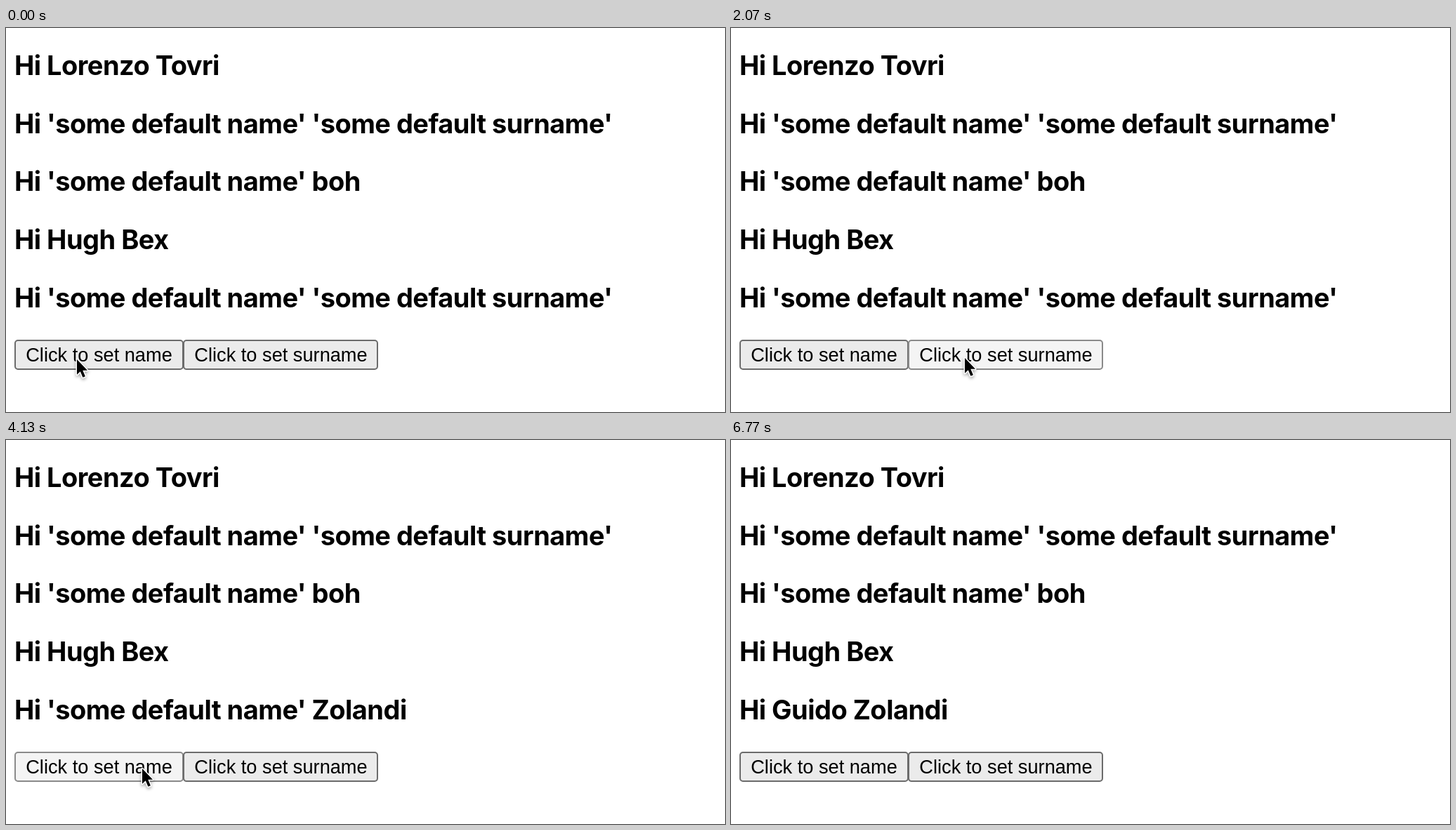
Animation of 1024 by 547 pixels, one loop 6.83 s. Source, as an HTML page:

```html
<!DOCTYPE html>
<html lang="en">
<head>
<meta charset="utf-8">
<title>Greeting demo</title>
<style>
  html, body { margin: 0; width: 100%; height: 100%; overflow: hidden; background: #fff; }
  .stage { position: relative; width: 1024px; height: 547px; overflow: hidden; color: #000; }

  h3 {
    position: absolute; left: 12px; top: calc(30px + 82.7px * var(--row)); margin: 0;
    font: 700 38px/46px Inter, "Liberation Sans", sans-serif;
    letter-spacing: -0.53px; white-space: pre;
  }

  .btn {
    position: absolute; top: 444px; height: 43px; box-sizing: border-box;
    border: 2px solid #6b6b6b; border-radius: 5px; background: #ebebeb;
    font: 27.2px/40px "Liberation Sans", Arial, sans-serif; text-align: center; white-space: pre;
  }
  .name { left: 12px; width: 241px; }
  .surname { left: 252px; width: 278px; padding-left: 1px; }

  .cursor { position: absolute; left: -5px; top: -5px; overflow: visible; filter: drop-shadow(0 2px 2px rgba(0,0,0,.35)); }

  .loop { animation: 6.83s step-end infinite; }
  .unset { animation-name: unset-text; }
  .half { animation-name: half-text; }
  .full { animation-name: full-text; }
  .name { animation-name: name-state; }
  .surname { animation-name: surname-state; }
  .cursor { animation-name: travel; }

  @keyframes unset-text { 0% { opacity: 1 } 30.72%, 100% { opacity: 0 } }
  @keyframes half-text { 0% { opacity: 0 } 30.72% { opacity: 1 } 61.9%, 100% { opacity: 0 } }
  @keyframes full-text { 0% { opacity: 0 } 61.9%, 100% { opacity: 1 } }

  @keyframes name-state {
    0%, 24.42%, 80.06%, 100% { background: #ebebeb; border-color: #6b6b6b }
    22.43%, 57.54%, 61.9% { background: #dfdfdf; border-color: #484848 }
    60.44% { background: #f4f4f4; border-color: #8a8a8a }
  }
  @keyframes surname-state {
    0%, 57.54%, 80.5%, 100% { background: #ebebeb; border-color: #6b6b6b }
    24.42%, 30.72%, 80.06% { background: #dfdfdf; border-color: #484848 }
    29.28% { background: #f4f4f4; border-color: #8a8a8a }
  }

  @keyframes travel {
    0% { transform: translate(101px, 471px) }
    21.96% { transform: translate(101px, 471px); animation-timing-function: steps(5) }
    24.42% { transform: translate(257px, 471px); animation-timing-function: steps(4) }
    26.35% { transform: translate(318px, 470px); animation-timing-function: steps(4) }
    28.26% { transform: translate(333px, 469px) }
    55.2% { transform: translate(333px, 469px); animation-timing-function: steps(4) }
    57.1% { transform: translate(262px, 468px); animation-timing-function: steps(4) }
    59% { transform: translate(194px, 467px) }
    80.06% { transform: translate(343px, 481px) }
    80.5% { transform: translate(720px, 493px) }
    80.94%, 100% { transform: translate(1100px, 493px) }
  }
</style>
</head>
<body>
<div class="stage">
  <h3 style="--row:0">Hi Lorenzo Tovri</h3>
  <h3 style="--row:1">Hi 'some default name' 'some default surname'</h3>
  <h3 style="--row:2">Hi 'some default name' boh</h3>
  <h3 style="--row:3">Hi Hugh Bex</h3>
  <h3 class="loop unset" style="--row:4">Hi 'some default name' 'some default surname'</h3>
  <h3 class="loop half" style="--row:4">Hi 'some default name' Zolandi</h3>
  <h3 class="loop full" style="--row:4">Hi Guido Zolandi</h3>

  <div class="btn loop name">Click to set name</div>
  <div class="btn loop surname">Click to set surname</div>

  <svg class="cursor loop" width="28" height="40" viewBox="-4 -4 28 40">
    <path d="M1 2V23.8L5.8 19.3L9.4 27.8L12.9 26.3L9.3 17.8H16Z"
      stroke="#fff" stroke-width="3" stroke-linejoin="round" paint-order="stroke"/>
  </svg>
</div>
</body>
</html>
```
